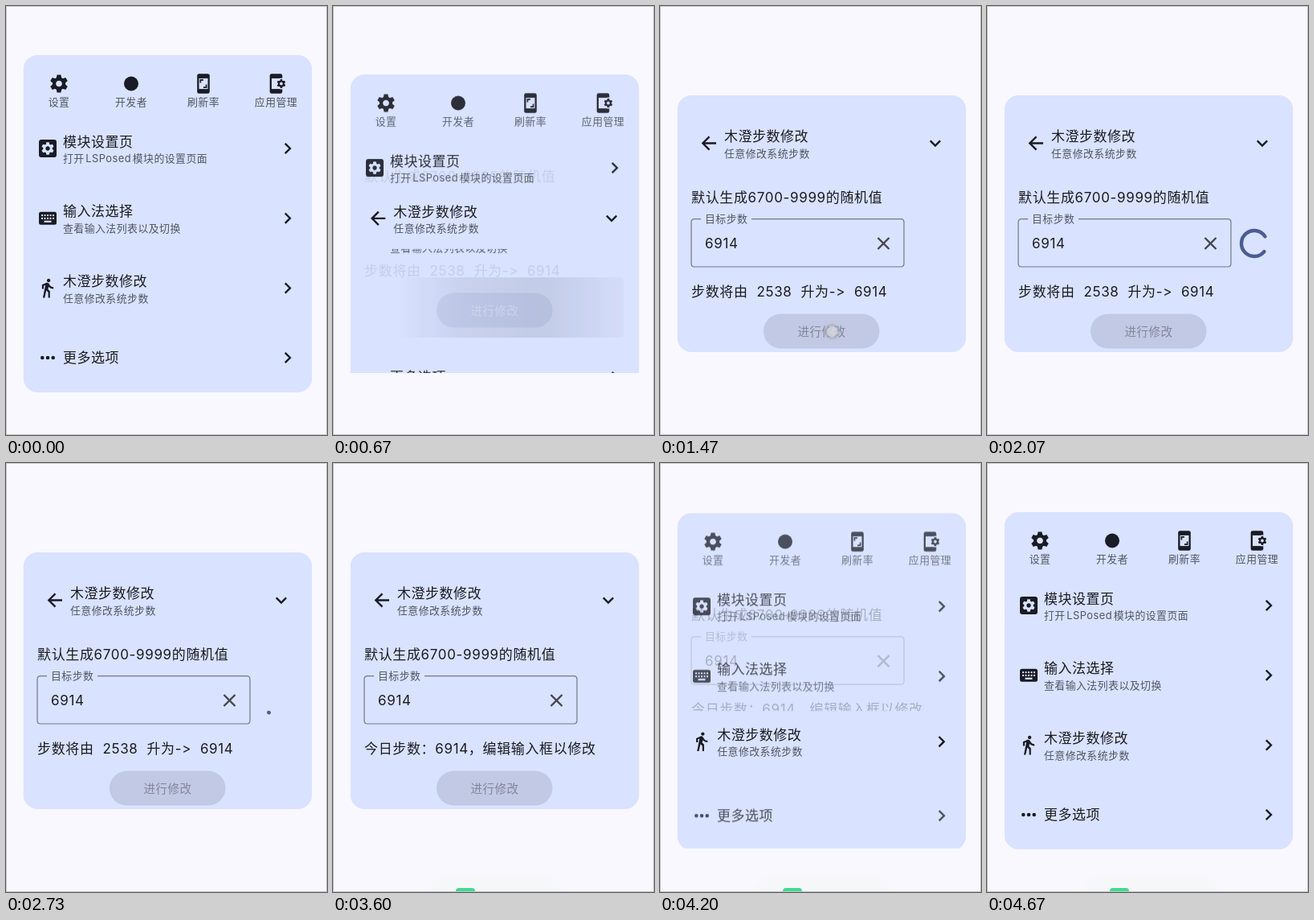
Write an HTML page that moves like this. It is 400x533 px and loops after 4740 ms.

```html
<!DOCTYPE html>
<html lang="zh-CN">
<head>
<meta charset="utf-8">
<style>
  html, body { margin: 0; height: 100%; overflow: hidden; background: #f9f8ff; }
  svg { display: block; width: 100vw; height: 100vh; color: #191b25; }
  text {
    font-family: Inter, "Noto Sans CJK SC", "Noto Sans CJK", sans-serif;
    font-size: 17px; letter-spacing: .5px; white-space: pre;
    font-variant-ligatures: none; font-feature-settings: "calt" 0;
    fill: #1a1b21;
  }
  .body { letter-spacing: .65px; }
  .small { font-size: 12.9px; letter-spacing: .45px; fill: #505663; }
  .button { font-size: 14.5px; text-anchor: middle; }
  .line { fill: none; stroke: currentColor; stroke-width: 2.4; }
  .card { fill: #d9e2ff; }
</style>
</head>
<body>
<svg viewBox="0 0 400 533">
  <defs>
    <g id="gear" fill="currentColor"></g>
    <g id="phone">
      <rect x="-7.8" y="-12.3" width="15.6" height="24.6" rx="2.4" fill="currentColor"/>
      <rect class="card" x="-5.5" y="-6.6" width="11" height="13.2"/>
    </g>
    <path id="next" class="line" d="M-3.2-6.2 3 0-3.2 6.2"/>
    <clipPath id="cardClip"><rect id="clipBox" x="21.5" width="360"/></clipPath>
    <linearGradient id="rippleFill">
      <stop offset=".12" stop-color="#1a1b21" stop-opacity="0"/>
      <stop offset=".4" stop-color="#1a1b21" stop-opacity=".75"/>
      <stop offset=".7" stop-color="#1a1b21"/>
      <stop offset="1" stop-color="#1a1b21" stop-opacity=".2"/>
    </linearGradient>
  </defs>

  <g clip-path="url(#cardClip)">
    <rect id="card" class="card" x="21.5" width="360" rx="18"/>
    <g id="list"></g>
    <g id="detail">
      <text class="body" x="39" y="243.8">默认生成6700-9999的随机值</text>
      <path class="line" style="stroke:#747785;stroke-width:1.2"
        d="M51 264.6H43q-4 0-4 4V320q0 4 4 4H300q4 0 4-4V268.600q0-4-4-4H114"/>
      <text class="small" x="56" y="269.3">目标步数</text>
      <text class="body" x="56" y="301.2">6914</text>
      <path class="line" style="stroke:#44464f" d="M271.5 288l14 14m0-14l-14 14"/>
      <text id="status" class="body" x="39" y="360.8"></text>
      <rect id="button" x="129" y="382.5" width="144.5" height="43" rx="21.5"/>
      <text id="buttonText" class="button" x="201.5" y="409.7">进行修改</text>
      <path id="spinner" class="line" stroke-linecap="round" style="stroke:#4a5c92;stroke-width:4.4"/>
      <g id="touch">
        <circle cx="214.5" cy="404.5" r="10" fill="#a9adba" opacity=".55"/>
        <circle cx="214.5" cy="404.5" r="6.5" fill="#e0e1e8" opacity=".65"/>
      </g>
    </g>
    <rect id="rowBack" class="card" x="36" width="329" height="76"/>
    <g id="rowMain">
      <path id="walk" fill="currentColor" transform="scale(1.1) translate(-12.5 -12.2)"
        d="M13.5 5.5c1.1 0 2-.9 2-2s-.9-2-2-2-2 .9-2 2 .9 2 2 2zM9.8 8.9L7 23h2.1l1.8-8 2.1 2v6h2v-7.5l-2.1-2 .6-3C14.8 12 16.8 13 19 13v-2c-1.9 0-3.5-1-4.3-2.4l-1-1.6c-.4-.6-1-1-1.7-1-.3 0-.5.1-.8.1L6 8.3V13h2V9.6l1.8-.7"/>
      <path id="back" class="line" d="M9 0H-7.5M.5-8.2l-8.2 8.2 8.2 8.2"/>
      <text x="19" y="-2.2">木澄步数修改</text>
      <text class="small" x="19" y="17.2">任意修改系统步数</text>
    </g>
    <g id="rowEnd">
      <use id="rowNext" href="#next"/>
      <path id="rowDown" class="line" d="M-6.2-3.2 0 3l6.2-6.2"/>
    </g>
  </g>

  <g id="toast">
    <rect x="118" y="514" width="172" height="60" rx="26" fill="#f6f7f8" style="filter:blur(4px)"/>
    <rect x="153" y="528" width="24" height="24" rx="4" fill="#3ddc91"/>
  </g>
  <rect x=".5" y=".5" width="399" height="532" fill="none" stroke="#c6c6ca"/>
</svg>

<script>
const LOOP = 4740, OPEN = 590, CLOSE = 3920, SUBMIT = 1430, LOAD = 1470, DONE = 3150, TOAST = 3380;
const $ = id => document.getElementById(id);
const set = (id, attrs) => { for (const k in attrs) $(id).setAttribute(k, attrs[k]); };
const show = (id, on) => { $(id).style.display = on ? '' : 'none'; };
const clamp = x => Math.min(1, Math.max(0, x));
const smooth = x => clamp(x) ** 2 * (3 - 2 * clamp(x));
const at = (x, y, body) => `<g transform="translate(${x} ${y})">${body}</g>`;
const gear = (x, y, scale) => `<use href="#gear" transform="translate(${x} ${y}) scale(${scale})"/>`;

$('gear').innerHTML = '<circle r="5.4" fill="none" stroke="currentColor" stroke-width="3.8"/>' +
  [0, 60, 120, 180, 240, 300].map(a =>
    `<path d="M-2.2-10h4.4l.9 4.5h-6.2z" transform="rotate(${a})"/>`).join('');

const keys = [-2.8, 1].map(y => [-7, -3.5, 0, 3.5, 7].map(x =>
  `<rect class="card" x="${x - 1}" y="${y - 1.8}" width="2" height="2"/>`).join('')).join('');
const icons = {
  module: '<rect x="-11" y="-11" width="22" height="22" rx="3" fill="currentColor"/>' +
    `<g color="#d9e2ff">${gear(0, 0, .77)}</g>`,
  keyboard: '<rect x="-11" y="-8" width="22" height="16" rx="2.5" fill="currentColor"/>' + keys +
    '<rect class="card" x="-4.5" y="3" width="9" height="2.2"/>',
  more: [-6.7, 0, 6.7].map(x => `<circle cx="${x}" r="2.3" fill="currentColor"/>`).join(''),
  refresh: '<use href="#phone"/><path class="line" style="stroke-width:1.7" ' +
    'd="M0-4.7h-3.6v3.6M0 4.7h3.6v-3.6"/>',
  apps: '<use href="#phone"/><circle class="card" cx="6.5" r="7"/>' + gear(6.5, 0, .54),
};

const shortcut = (x, icon, label) => at(x, 96.5, icon) +
  `<text class="small" text-anchor="middle" x="${x}" y="123.6">${label}</text>`;
const item = (y, icon, title, sub) => at(52, y, icon) + at(351, y, '<use href="#next"/>') +
  `<text x="71" y="${y + (sub ? -2.5 : 6.2)}">${title}</text>` +
  (sub ? `<text class="small" x="71" y="${y + 17}">${sub}</text>` : '');

$('list').innerHTML =
  shortcut(66, gear(0, 0, 1.1), '设置') +
  shortcut(156, '<circle r="9" fill="currentColor"/>', '开发者') +
  shortcut(246, icons.refresh, '刷新率') +
  shortcut(336.5, icons.apps, '应用管理') +
  item(177, icons.module, '模块设置页', '打开&#x200A;LSPosed&#x200A;模块的设置页面') +
  item(263.7, icons.keyboard, '输入法选择', '查看输入法列表以及切换') +
  item(437, icons.more, '更多选项') +
  '<rect id="ripple" x="39" y="313" width="323" height="75" rx="4" fill="url(#rippleFill)"/>';

// Critically damped spring, t in ms
const spring = t => t <= 0 ? 0 : 1 - (1 + t / 50) * Math.exp(-t / 50);

// cubic-bezier(.4, 0, .2, 1)
function ease(x) {
  let lo = 0, hi = 1;
  for (let i = 0; i < 16; i++) {
    const u = (lo + hi) / 2;
    if (1.2 * u * (1 - u) ** 2 + .6 * u * u * (1 - u) + u ** 3 < x) lo = u; else hi = u;
  }
  return 3 * lo * lo - 2 * lo ** 3;
}

function spinnerPath(t) {
  const cycle = Math.floor(t / 1332), u = t % 1332;
  const base = -90 + 216 * cycle + 286 * u / 1332;
  const tail = 290 * ease(clamp((u - 666) / 666));
  const head = Math.max(290 * ease(clamp(u / 666)), tail + .2);
  const point = deg => {
    const a = (base + deg) * Math.PI / 180;
    return `${333 + 16 * Math.cos(a)} ${295 + 16 * Math.sin(a)}`;
  };
  return `M${point(tail)}A16 16 0 ${head - tail > 180 ? 1 : 0} 1 ${point(head)}`;
}

function draw(t) {
  const opened = t >= OPEN && t < CLOSE;
  const p = t < CLOSE ? spring(t - OPEN) : 1 - spring(t - CLOSE);
  const fade = t < CLOSE ? smooth((t - OPEN) / 420) : 1 - smooth((t - CLOSE) / 420);
  const top = 61 + 50 * p, height = 419 - 100 * p, rowY = 350.5 - 180 * p;

  set('clipBox', { y: top, height });
  set('card', { y: top, height: height + 100 * Math.min(p, 1 - p) });
  set('list', { transform: `translate(0 ${50 * p})`, opacity: 1 - fade });
  set('detail', { transform: `translate(0 ${50 * p - 50})`, opacity: fade });

  set('rowBack', { y: rowY - 38 });
  show('rowBack', p > .005 && p < .995);
  set('rowMain', { transform: `translate(${52 + 9 * p} ${rowY})` });
  set('rowEnd', { transform: `translate(${351 - 8 * p} ${rowY})` });
  show('walk', !opened);
  show('rowNext', !opened);
  show('back', opened);
  show('rowDown', opened);
  set('ripple', { opacity: .12 * clamp((t - 500) / 90) * clamp((850 - t) / 150) });
  show('ripple', t < 850);

  const enabled = t < SUBMIT;
  set('button', { fill: enabled ? '#4a5c92' : '#1a1b21', 'fill-opacity': enabled ? 1 : .12 });
  $('buttonText').style.fill = enabled ? '#fff' : 'rgba(26,27,33,.38)';
  $('status').textContent = t < DONE ? '步数将由  2538  升为->  6914' : '今日步数：6914，编辑输入框以修改';
  set('touch', { opacity: clamp((t - 1350) / 50) * clamp((1540 - t) / 60) });

  const loading = t > LOAD + 10 && t < DONE;
  show('spinner', loading);
  if (loading) set('spinner', { d: spinnerPath(t - LOAD) });

  show('toast', t >= TOAST);
  set('toast', { transform: `translate(0 ${30 * (1 - ease(clamp((t - TOAST) / 200)))})` });
}

const start = performance.now();
(function tick() {
  draw((performance.now() - start) % LOOP);
  requestAnimationFrame(tick);
})();
</script>
</body>
</html>
```
